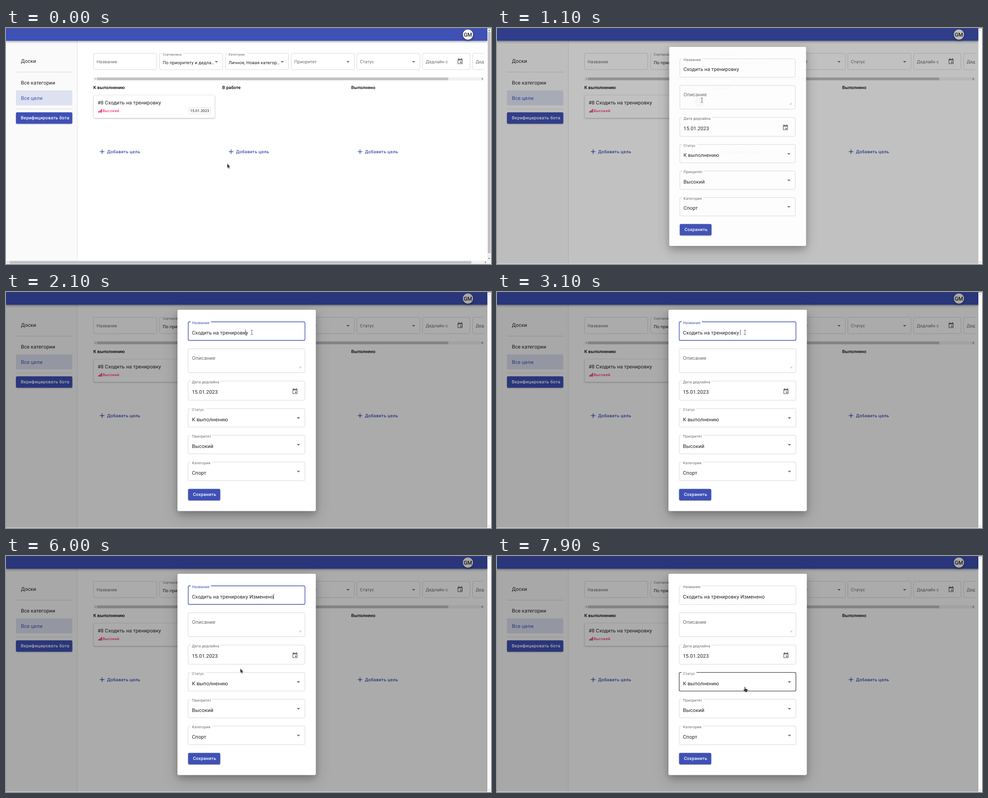
An HTML page for the animation above (8 s loop, 1072 by 522 pixels).

```html
<!DOCTYPE html>
<html lang="ru">
<head>
<meta charset="utf-8">
<title>Цели</title>
<style>
  html, body { margin: 0; width: 100%; height: 100%; overflow: hidden; background: #fff; }
  svg { display: block; width: 1072px; height: 522px; }
  text { font-family: Roboto, "Noto Sans", sans-serif; white-space: pre; text-rendering: geometricPrecision; }
  .soft { filter: drop-shadow(0 1px 1px rgba(0,0,0,.28)); }
  .bar { filter: drop-shadow(0 2px 2.5px rgba(0,0,0,.35)); }
  .deep { filter: drop-shadow(0 7px 8px rgba(0,0,0,.22)) drop-shadow(0 8px 16px rgba(0,0,0,.16)); }
</style>
</head>
<body>
<svg id="stage" viewBox="0 0 1072 522" xmlns="http://www.w3.org/2000/svg"></svg>
<script>
const LOOP = 8000, STEP = 100;
const BLUE = '#3f51b5', INK = '#212121', DIM = '#6b6b6b', PINK = '#f50057', LINE = 'rgba(0,0,0,.2)';
const BODY = 11.15, SMALL = 9.76, TINY = 8.36;
const TITLE = 'Сходить на тренировку';

// --- markup helpers ---
const rect = (x, y, w, h, fill, extra = '') =>
  `<rect x="${x}" y="${y}" width="${w}" height="${h}" fill="${fill}" ${extra}/>`;
const path = (d, fill, extra = '') => `<path d="${d}" fill="${fill}" ${extra}/>`;
// cy is the middle of the capital letters
const text = (x, cy, s, size = BODY, fill = INK, o = {}) =>
  `<text x="${x}" y="${cy + size * 0.356}" font-size="${size}" fill="${fill}" font-weight="${o.weight || 400}"` +
  ` letter-spacing="${(o.track ?? 0.0094) * size}" ${o.extra || ''}>${s}</text>`;
const group = (id, body, extra = '') => `<g id="${id}" ${extra}>${body}</g>`;
const outline = (x, y, w, h, id = '') =>
  rect(x, y, w, h, 'none', `rx="2.8" stroke="${LINE}" stroke-width=".8" ${id && `id="${id}"`}`);
const drop = (x, y) => path(`M${x - 3.6} ${y - 1.8}h7.2l-3.6 3.6z`, DIM);
const button = (x, y, w, h, s, tx) =>
  rect(x, y, w, h, BLUE, 'rx="2.8" class="soft"') +
  text(tx, y + h / 2 - 0.3, s, SMALL, '#fff', { weight: 500, track: 0.0286 });
const calendar = (x, y) =>
  `<g transform="translate(${x} ${y})">` +
  path('M-5.4-5h10.8v11h-10.8zM-4.1-2v6.8h8.2v-6.8z', DIM, 'fill-rule="evenodd"') +
  rect(-3.8, -6.8, 1.5, 2.2, DIM) + rect(2.3, -6.8, 1.5, 2.2, DIM) + rect(0, 0.8, 3, 3, DIM) + '</g>';
const tip = (x, y, turn, fill) =>
  path('M-2 1.2L0-1.2L2 1.2z', fill, `transform="translate(${x} ${y}) rotate(${turn})"`);

// --- page ---
function header() {
  return rect(0, 0, 1064, 28.3, BLUE, 'class="bar"') + rect(0, 0, 1072, 0.9, '#5b6079') +
    '<circle cx="1021" cy="14.5" r="11.2" fill="#fafafa" class="bar"/>' +
    text(1021, 14.4, 'GM', 11.8, INK, { weight: 500, extra: 'text-anchor="middle"' });
}

function sidebar() {
  return rect(0, 28, 157.5, 494, '#fafafa') + rect(157.2, 28, 0.9, 494, '#dcdcdc') +
    text(33, 73, 'Доски') + rect(22, 97, 124.5, 0.8, '#cfcfcf') +
    text(33, 121, 'Все категории') +
    rect(22, 138, 124.5, 33.2, '#dde1f0') + text(33, 154.6, 'Все цели', BODY, BLUE) +
    rect(22, 178.7, 124.5, 0.8, '#cfcfcf') +
    button(22, 186.5, 124.5, 25.3, 'Верифицировать бота', 32.7);
}

function filters() {
  const box = (x, w = 139.5) => outline(x + 0.5, 56, w, 36);
  const chosen = (x, label, s) => box(x) + rect(x + 5, 55, label.length * 4.1 + 6, 2, '#fff') +
    text(x + 7.5, 58, label, SMALL * 0.75, DIM) + text(x + 7.5, 76.8, s, SMALL) + drop(x + 126, 75);
  const empty = (x, s) => box(x) + text(x + 7.3, 74.5, s, SMALL, DIM) + drop(x + 126, 75);
  return box(193) + text(200.3, 74.5, 'Название', SMALL, DIM) +
    chosen(339, 'Сортировка', 'По приоритету и дедла…') +
    chosen(484.5, 'Категории', 'Личное, Новая категор…') +
    empty(630, 'Приоритет') + empty(775, 'Статус') +
    box(920.3, 104.7) + text(927.8, 74.5, 'Дедлайн с', SMALL, DIM) + calendar(1003.7, 73.5) +
    box(1031, 104.7) + text(1038.2, 74.5, 'Дедлайн по', SMALL, DIM);
}

function board() {
  const plus = x => path(`M${x - 5} 273.6h10M${x} 268.6v10`, 'none', `stroke="${BLUE}" stroke-width="1.5"`);
  const column = (x, s) => text(x, 131.6, s, SMALL, '#000', { weight: 500, track: 0.007 }) +
    plus(x + 19.5) + text(x + 30.4, 273.5, 'Добавить цель', SMALL, BLUE, { weight: 500, track: 0.0286 });
  const bars = [3, 5, 7.6].map((h, i) => rect(204.2 + i * 2.9, 187 - h, 1.9, h, PINK)).join('');
  const pencil = path('M-4.2 4.2v-1.9L1.4-3.3l1.9 1.9L-2.3 4.2zM2-3.9l.9-.9q.5-.4 1 0l.9.9q.4.5 0 1l-.9.9z', '#fff');
  return column(193, 'К выполнению') + column(478, 'В работе') + column(763, 'Выполнено') +
    rect(193.6, 148.5, 268, 50.6, '#fff', 'rx="2.8" stroke="#e2e2e2" stroke-width=".7" class="soft"') +
    text(202.4, 164.8, '#8 ' + TITLE) + bars +
    text(213.4, 183.2, 'Высокий', TINY, PINK, { track: 0.033 }) +
    rect(403.6, 176, 49, 14.2, '#fff', 'rx="2.5" stroke="#d6d6d6" stroke-width=".8"') +
    text(407, 183.2, '15.01.2023', TINY, INK, { track: 0 }) +
    group('edit', `<circle r="10.6" fill="${BLUE}" class="soft"/>` + pencil, 'transform="translate(446.8 163.2)"');
}

function innerScroll() {
  return rect(193, 108.8, 864, 7.4, '#f1f1f1') + rect(201, 109.6, 776.5, 5.8, '#c1c1c1') +
    tip(197.5, 112.5, -90, '#a3a3a3') + tip(1053, 112.5, 90, '#505050');
}

function pageScroll() {
  return rect(1064, 0.9, 8, 521.1, '#f1f1f1') + rect(0, 514.4, 1072, 7.6, '#f1f1f1') +
    rect(1065, 9, 6, 489, '#c1c1c1') + rect(8, 515.5, 1020.5, 5.7, '#c1c1c1') +
    tip(1068, 5, 0, '#505050') + tip(1068, 510, 180, '#505050') +
    tip(4, 518.3, -90, '#a3a3a3') + tip(1060, 518.3, 90, '#505050');
}

function lockedScroll() {
  return rect(1064, 0.9, 8, 521.1, '#fafafa') + rect(0, 521.2, 1072, 0.8, '#ececec') +
    tip(1068, 5, 0, '#b4b4b4') + tip(1068, 518, 180, '#b4b4b4');
}

// --- dialog ---
const FIELDS = [
  { id: 'name', top: 66, h: 41, label: 'Название', ly: 67.7, ty: 89.6, gap: 45 },
  { id: 'note', top: 125.5, h: 53, label: 'Описание', ly: 127, ty: 146.2, gap: 45 },
  { id: 'date', top: 197, h: 42.4, label: 'Дата дедлайна', ly: 199, ty: 221.3, gap: 66, value: '15.01.2023' },
  { id: 'state', top: 257.5, h: 41.2, label: 'Статус', ly: 260, ty: 281.7, gap: 33, value: 'К выполнению', menu: 1 },
  { id: 'rank', top: 316.8, h: 41.2, label: 'Приоритет', ly: 319, ty: 340.9, gap: 48, value: 'Высокий', menu: 1 },
  { id: 'kind', top: 376.2, h: 41.2, label: 'Категория', ly: 378.2, ty: 400, gap: 47, value: 'Спорт', menu: 1 }
];

function field(f) {
  return outline(402.7, f.top, 258, f.h, f.id + 'Box') +
    rect(408, f.top - 1.2, f.gap, 2.4, '#fff', `id="${f.id}Gap"`) +
    text(411, f.ly, f.label, TINY, DIM, { extra: `id="${f.id}Label"` }) +
    (f.value ? text(411, f.ty, f.value) : '') + (f.menu ? drop(646.4, f.ty - 2.8) : '');
}

function dialog() {
  return rect(379, 39.2, 305.8, 445.2, '#fff', 'rx="2.8" class="deep"') + FIELDS.map(field).join('') +
    text(411, 89.6, '', BODY, INK, { extra: 'id="nameText"' }) +
    text(411, 148.8, 'Описание', BODY, '#a6a6a6', { extra: 'id="hint"' }) +
    rect(0, 0, 0.8, 12.5, INK, 'id="caret"') +
    path('M648 168.6l4.4-4.4M650.4 168.6l2-2', 'none', 'stroke="#8a8a8a" stroke-width=".8"') +
    calendar(638.7, 219.4) + button(402.5, 435.5, 71, 25.4, 'Сохранить', 413.2);
}

// --- pointers ---
const EDGE = 'stroke="#fff" stroke-width=".8" stroke-linejoin="round" paint-order="stroke"';
const pointers = {
  arrow: path('M0 0V9.4L2.1 7.5L3.6 11L5.3 10.2L3.8 6.8H6.6z', '#3d3d3d', EDGE),
  beam: path('M-2.2-5.2Q0-5.2 0-4Q0-5.2 2.2-5.2M0-4.4V4.4M-2.2 5.2Q0 5.2 0 4Q0 5.2 2.2 5.2', 'none',
    'stroke="#555" stroke-width=".9"'),
  hand: path('M-.9.6Q-.9-.6 0-.6T.9.6V3.6L5 4.5Q6.2 4.8 6 6L5.2 9V10.8H-.4V9.4L-3.2 6.2Q-3.6 5.2-2.4 5L-.9 6z', '#3d3d3d', EDGE)
};

document.getElementById('stage').innerHTML =
  rect(0, 0, 1072, 522, '#fff') + sidebar() +
  '<clipPath id="clip"><rect x="190" y="40" width="867" height="70"/></clipPath>' +
  `<g clip-path="url(#clip)">${filters()}</g>` + innerScroll() + board() + header() +
  group('veil', rect(0, 0, 1064, 522, '#000')) +
  group('free', pageScroll()) + group('locked', lockedScroll()) +
  group('dialog', dialog()) +
  Object.keys(pointers).map(k => group(k, pointers[k])).join('');

// --- motion ---
const el = id => document.getElementById(id);
const show = (id, on) => el(id).setAttribute('visibility', on ? 'visible' : 'hidden');
const set = (id, attrs) => { for (const k in attrs) el(id).setAttribute(k, attrs[k]); };

// Piecewise linear track: rows of [time, value, value...]
function track(rows, t) {
  const i = rows.findIndex(r => r[0] > t);
  if (i < 0) return rows[rows.length - 1].slice(1);
  if (i === 0) return rows[0].slice(1);
  const a = rows[i - 1], b = rows[i], p = (t - a[0]) / (b[0] - a[0]);
  return a.slice(1).map((v, k) => v + (b[k + 1] - v) * p);
}

const MOUSE = [
  [0, 489, 300], [200, 522, 287], [400, 560, 240], [500, 538, 208], [700, 453, 160],
  [1200, 453, 159.6], [1700, 528, 89.4], [2100, 543.3, 89.4], [2200, 546.5, 89.4], [2300, 546.5, 89.4],
  [2400, 547, 89.4], [2500, 547, 89.4], [2600, 548, 89.4], [5500, 548, 89.4], [6000, 518, 249],
  [6100, 518, 249], [6300, 512, 295], [6400, 511, 280], [6700, 497, 162], [6800, 497, 167],
  [7000, 494, 214], [7900, 548, 290]
];
// scale, opacity, veil
const OPEN = [[900, 0.75, 0, 0], [1000, 0.785, 0.37, 0.042], [1100, 0.989, 0.97, 0.245], [1200, 1, 1, 0.33]];
const FLOAT = [[6600, 0], [6800, 1], [7400, 1], [7600, 0]];
const KEYS = [[3100, ' '], [3600, 'И'], [3700, 'з'], [4400, 'м'], [4600, 'е'], [4700, 'н'], [4800, 'е'], [4900, 'н'], [5000, 'о']];

function draw(now) {
  const t = Math.floor((now % LOOP) / STEP) * STEP;
  const [mx, my] = track(MOUSE, t);
  const [scale, alpha, veil] = track(OPEN, t);
  const open = t >= 1000;

  show('edit', t >= 700);
  show('free', !open);
  show('locked', open);
  set('veil', { opacity: veil });
  set('dialog', {
    opacity: alpha,
    transform: `translate(532 261.8) scale(${scale}) translate(-532 -261.8)`
  });

  const focus = t >= 1700 && t < 6700 ? 'name' : t >= 6700 && t < 7500 ? 'note' : '';
  const over = t >= 1100 && FIELDS.find(f => my >= f.top && my <= f.top + f.h);
  for (const f of FIELDS) {
    const on = f.id === focus, hot = over === f && t >= 1200;
    set(f.id + 'Box', { stroke: on ? BLUE : hot ? INK : LINE, 'stroke-width': on ? 1.4 : hot ? 1.1 : 0.8 });
    set(f.id + 'Label', { fill: on ? BLUE : DIM });
  }

  const [up] = track(FLOAT, t);
  const size = BODY + (TINY - BODY) * up;
  set('noteLabel', { 'font-size': size, y: 146.2 + (127 - 146.2) * up + size * 0.356 });
  show('noteGap', up > 0.4);
  set('hint', { opacity: focus === 'note' ? up : 0 });

  const name = el('nameText');
  name.textContent = TITLE + KEYS.filter(k => t >= k[0]).map(k => k[1]).join('');
  const at = t < 2200 ? TITLE.length - 1 : name.textContent.length;
  const blink = t >= 2900 && t < 3100;
  show('caret', focus && !blink);
  set('caret', focus === 'note'
    ? { x: 410.8, y: 142.4 }
    : { x: 411 + name.getSubStringLength(0, at) - 0.3, y: 83.3 });

  const kind = !over ? 'arrow' : over.menu ? 'hand' : 'beam';
  for (const k in pointers) show(k, k === kind);
  set(kind, { transform: `translate(${mx} ${my})` });
}

function tick(now) {
  draw(now);
  requestAnimationFrame(tick);
}
draw(0);
requestAnimationFrame(tick);
</script>
</body>
</html>
```
